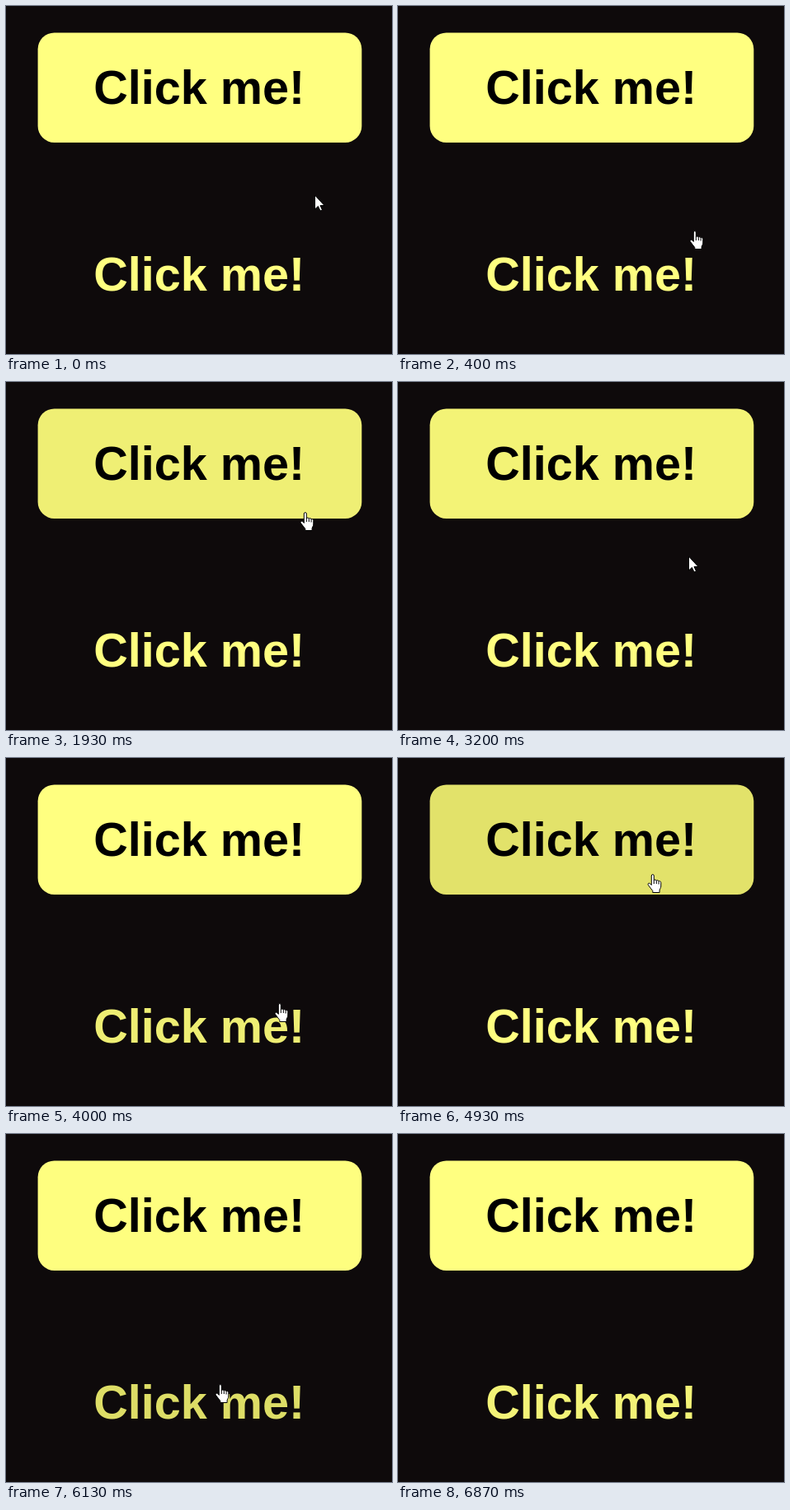
Recreate the animation shown at these times as an HTML page. Size 468x423 px, loop 7.47 s.

```html
<!DOCTYPE html>
<html lang="en">
<head>
<meta charset="utf-8">
<title>Button states</title>
<style>
html, body { margin: 0; width: 100%; height: 100%; overflow: hidden; background: #0e0a0b; }
svg { display: block; width: 468px; height: 423px; }
text { font: bold 57.6px "Liberation Sans", Arial, sans-serif; text-anchor: middle; }
#arrow, #hand { fill: #fff; stroke: #000; stroke-linejoin: round; }
</style>
</head>
<body>
<svg viewBox="0 0 468 423">
  <rect width="468" height="423" fill="#0e0a0b"/>
  <rect id="filled" x="38.6" y="32.4" width="392.7" height="133.5" rx="20"/>
  <text x="234.2" y="119.4">Click me!</text>
  <text id="plain" x="234.2" y="346.3">Click me!</text>
  <g id="cursor">
    <path id="arrow" d="M-.5-1V16L3.4 12.4 6 18 8.5 17 6 11.5H11Z"/>
    <g id="hand" transform="translate(-6.7 0)">
      <path d="M5 2C5 .1 8 .1 8 2V8C8 6.6 11 6.6 11 8.4 11 7.2 13.8 7.3 13.8 9.2 13.8 8.2 16.5 8.4 16.5 10.5V15C16.5 17 14.8 18.5 14.8 20V22.5H6.5V20.5C5 18.5 3 16 1.2 13.6 0 11.8 1.8 10.4 3.2 11.6L5 13.4Z"/>
      <path d="M8 8V12M11 8.5V12M13.8 9.5V12.5" fill="none"/>
    </g>
  </g>
</svg>
<script>
const LOOP = 7470, STEP = 1000 / 15, CURSOR_GONE = 6850;
const NORMAL = [255, 255, 128], PRESSED = [221, 221, 102];
const $ = id => document.getElementById(id);

// The cursor rests between moves; times are in ms.
const origin = { x: 375, y: 231 };
const moves = [
  { from: 0, to: 400, x: 360, y: 273 },
  { from: 533, to: 1000, x: 390, y: 235 },
  { from: 1000, to: 1333, x: 376, y: 205 },
  { from: 1333, to: 1667, x: 199, y: 95 },
  { from: 1667, to: 1933, x: 363, y: 158 },
  { from: 3000, to: 3467, x: 338, y: 298 },
  { from: 3800, to: 4000, x: 332, y: 298 },
  { from: 4000, to: 4533, x: 309, y: 141 },
  { from: 5200, to: 5867, x: 259.5, y: 304 },
  { from: 6400, to: 6800, x: 129, y: 400 }
];

// Each button is hovered once, then visited again and clicked.
const buttons = {
  filled: { hover: [1440, 3130], click: [4270, 4650, 4900, 5430] },
  plain: { hover: [3400, 4200], click: [5733, 6050, 6300, 6680] }
};

const clamp = k => Math.min(1, Math.max(0, k));
const smooth = k => k * k * (3 - 2 * k);
const mix = (a, b, k) => a + (b - a) * k;

function cursorAt(t) {
  let { x, y } = origin;
  for (const move of moves) {
    const k = smooth(clamp((t - move.from) / (move.to - move.from)));
    x = mix(x, move.x, k);
    y = mix(y, move.y, k);
  }
  return { x: Math.round(x), y: Math.round(y) };
}

// 0 is the resting colour, 1 the pressed one; hovering fades, clicks snap.
function shadeAt({ hover, click }, t) {
  const times = [...hover, ...click];
  const levels = [.52, 0, .55, 1, .85, 0];
  return levels.reduce((shade, level, i) => {
    const age = Math.max(0, t - times[i]);
    const fade = level > .8 ? 12 : 200;
    return mix(level, shade, Math.exp(-age / fade));
  }, 0);
}

function paint(id, t) {
  const shade = shadeAt(buttons[id], Math.min(t, CURSOR_GONE));
  const rgb = NORMAL.map((v, i) => Math.round(mix(v, PRESSED[i], shade)));
  $(id).setAttribute("fill", `rgb(${rgb})`);
}

const show = (id, on) => $(id).setAttribute("display", on ? "inline" : "none");

function draw(time) {
  // Motion ticks at 15 steps per second, rounded to hundredths of a second.
  const t = Math.floor((time % LOOP + 3.4) / STEP) * STEP;
  const { x, y } = cursorAt(t);
  const over = y < 166 || y > 259 && y < 392;
  Object.keys(buttons).forEach(id => paint(id, t));
  $("cursor").setAttribute("transform", `translate(${x} ${y})`);
  show("cursor", t < CURSOR_GONE);
  show("hand", over);
  show("arrow", !over);
}

const start = performance.now();
function tick() {
  draw(performance.now() - start);
  requestAnimationFrame(tick);
}
tick();
</script>
</body>
</html>
```
